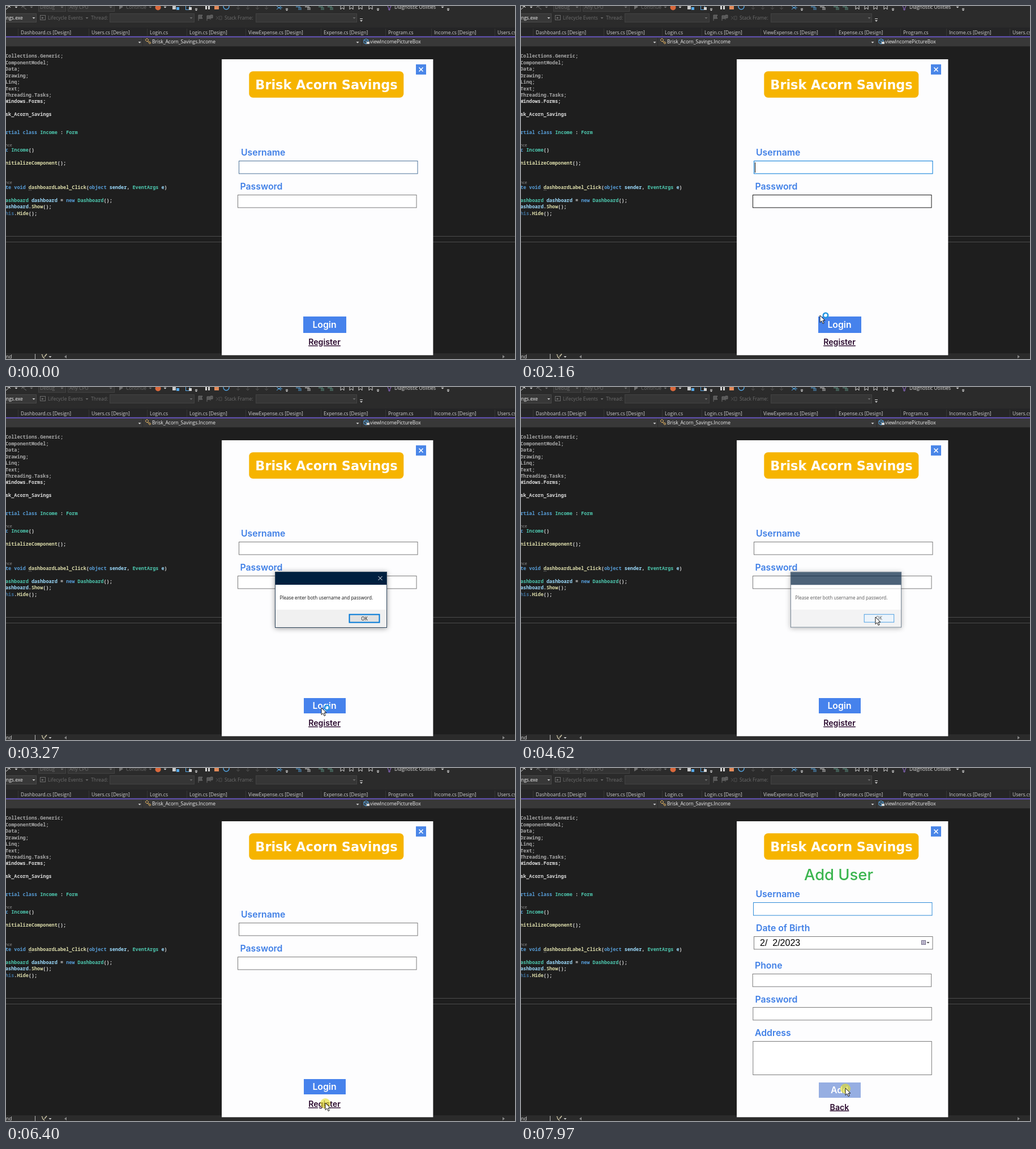
An HTML page for the animation above (8 s loop, 899 px wide and 623 px high).

```html
<!DOCTYPE html>
<html lang="en">
<head>
<meta charset="utf-8">
<title>Login form demo</title>
<style>
  html, body { margin: 0; width: 100%; height: 100%; overflow: hidden; background: #1e1e1e; }
  svg { display: block; width: 899px; height: 623px; }
  text { white-space: pre; font-family: "Open Sans", sans-serif; font-size: 8.5px; }
  .code text { font-family: "Noto Sans Mono", "DejaVu Sans Mono", monospace; font-size: 8.5px; font-weight: 600; }
  .form text { font-family: Inter, Arial, sans-serif; font-size: 15.8px; font-weight: 600; }
  .form text.title { font-family: "DejaVu Sans", sans-serif; font-size: 22.4px; font-weight: bold; }
  .form text.head { font-size: 27.4px; font-weight: 500; }
  .form text.date { font-family: "Liberation Sans", Arial, sans-serif; font-size: 16px; font-weight: normal; }
  .form text.link { font-size: 14.2px; text-decoration: underline; }
  #dialog { filter: drop-shadow(0 1px 5px rgba(0, 0, 0, .4)); }
  #dialog text { font-size: 8.13px; }
</style>
</head>
<body>
<svg id="stage" viewBox="0 0 899 623" xmlns="http://www.w3.org/2000/svg"></svg>
<script>
const NS = 'http://www.w3.org/2000/svg';
const LOOP = 8000;
const BLUE = '#4682ec', HOVER = '#3f75d3', PRESSED = '#96aee2';
const FOCUS = '#0078d7', GREY = '#7a7a7a', DARK = '#171717';

function add(parent, tag, attrs = {}, content) {
  const node = document.createElementNS(NS, tag);
  for (const key in attrs) node.setAttribute(key, attrs[key]);
  if (content !== undefined) node.textContent = content;
  return parent.appendChild(node);
}
const group = (parent, attrs) => add(parent, 'g', attrs);
const rect = (p, x, y, w, h, fill, more) => add(p, 'rect', { x, y, width: w, height: h, fill, ...more });
const text = (p, x, y, str, fill, more) => add(p, 'text', { x, y, fill, ...more }, str);
const path = (p, d, stroke, fill = 'none', more) => add(p, 'path', { d, stroke, fill, ...more });
const down = (p, x, y, fill = '#d0d0d0') => path(p, `M${x - 2.5} ${y - 1}h5l-2.5 2.8z`, 'none', fill);
const show = (node, on) => node.setAttribute('visibility', on ? 'visible' : 'hidden');

const stage = document.getElementById('stage');

function buildToolbar() {
  const g = group(stage);
  const dim = '#6d6d6d', lit = '#d6d6d6', sky = '#55a8e8';
  rect(g, 0, 0, 899, 38, '#2b2b2b');
  rect(g, 0, 38, 899, 16, '#252526');

  // upper row, cut off by the top edge
  path(g, 'M0 6L7 0M2 0q5 0 6 3', lit);
  path(g, 'M36 6L28 0M34 0q-5 0 -7 3', dim);
  for (const [x, w, label] of [[57, 48, 'Debug'], [109, 82, 'Any CPU']]) {
    rect(g, x + .5, -10.5, w, 20, '#333', { stroke: '#424242' });
    text(g, x + 3, 5, label, dim);
    down(g, x + w - 6, 2, dim);
  }
  path(g, 'M200 -3v9l7 -4.5z', 'none', dim);
  text(g, 212, 5, 'Continue', dim);
  for (const x of [18, 281, 771]) down(g, x, 2);
  for (const x of [45, 255]) down(g, x, 2, dim);
  add(g, 'circle', { cx: 268.5, cy: 2.5, r: 5, fill: '#d9683c' });
  rect(g, 294, 0, 6, 6, '#c9c9c9');
  rect(g, 301, 2, 5, 5, sky);
  rect(g, 317.5, -3.5, 7, 10, 'none', { stroke: sky });
  rect(g, 323, 2, 5, 5, lit);
  for (const x of [336, 496, 657, 781]) {
    rect(g, x - 2, 4, 4, 1, lit);
    down(g, x, 7);
  }
  rect(g, 352, 0, 3, 6, lit);
  rect(g, 357, 0, 3, 6, lit);
  rect(g, 368, 0, 8, 6, '#e28a5a');
  add(g, 'circle', { cx: 389, cy: 1, r: 5, fill: 'none', stroke: sky, 'stroke-width': 1.4 });
  for (const x of [410, 427, 444, 460]) path(g, `M${x} -2v8m-3 -3l3 3 3 -3`, '#505050');
  path(g, 'M478 0l8 6M478 6l8 -6M480 3h8', sky);
  for (const [x, c] of [[517, sky], [533, lit], [557, '#5f9a8a'], [573, '#5f9a8a']]) {
    path(g, `M${x - 5} 1.5h8M${x - 1} 3.5h6M${x - 1} 6h6`, c);
  }
  for (const x of [594, 610, 626, 644]) path(g, `M${x - 3} -2v8l3 -3 3 3v-8`, lit);
  path(g, 'M674 0a3.5 3.5 0 1 1 6 0l-2 4v3h-2v-3z', '#9a72dc');
  text(g, 686, 5, 'Diagnostic Utilities', '#dcdcdc');

  // lower row
  rect(g, -5, 13.5, 58.5, 15, '#383838', { stroke: '#484848' });
  text(g, 0, 24, 'ngs.exe', '#f0f0f0');
  down(g, 49, 21);
  rect(g, 60.5, 16.5, 9, 8, 'none', { stroke: dim });
  path(g, 'M63 19l4 2 -4 2z', 'none', dim);
  text(g, 74, 24, 'Lifecycle Events', dim);
  down(g, 143, 21, dim);
  text(g, 150, 24, 'Thread:', dim);
  rect(g, 183.5, 13.5, 149, 15, '#363636', { stroke: '#424242' });
  down(g, 327, 21, dim);
  path(g, 'M340 26v-10h7l-2 3 2 3h-7', dim, '#555');
  path(g, 'M355 26v-9h5v5h-5M361 24v-8h4v5h-4', dim, '#555');
  path(g, 'M371 18l5 6m0 -6l-5 6M377 18h4v6h-4z', '#4c4c4c');
  text(g, 386, 24, 'Stack Frame:', dim);
  rect(g, 441.5, 13.5, 178, 15, '#363636', { stroke: '#424242' });
  down(g, 615, 21, dim);
  rect(g, 625, 22, 5, 1, lit);
  down(g, 627.5, 26);

  const tabs = [[26, 'Dashboard.cs [Design]'], [151, 'Users.cs [Design]'], [254, 'Login.cs'],
    [324, 'Login.cs [Design]'], [428, 'ViewExpense.cs [Design]'], [561, 'Expense.cs [Design]'],
    [675, 'Program.cs'], [756, 'Income.cs [Design]'], [868, 'Users.cs [Design]']];
  for (const [x, label] of tabs) {
    rect(g, x - 5, 40, 1, 13, '#363636');
    text(g, x, 50, label, '#cfcfcf');
  }

  // navigation bar
  rect(g, 0, 55, 899, 16.5, '#383838');
  rect(g, 0, 53.5, 899, 1.8, '#6a58c8');
  rect(g, 241, 56, 1, 15, '#2a2a2a');
  rect(g, 628, 56, 1, 15, '#2a2a2a');
  down(g, 236, 64);
  down(g, 621, 64);
  path(g, 'M246 60l3 -3 3 3 -3 3zM250 63h3M252 65l2 -2 2 2 -2 2z', '#e0b060');
  text(g, 258, 66.3, 'Brisk_Acorn_Savings.Income', '#f0f0f0');
  path(g, 'M632 60l4 -2 4 2v5l-4 2 -4 -2zM632 60l4 2 4 -2M636 62v5', sky);
  rect(g, 637, 63, 5, 4, lit);
  text(g, 643, 66.3, 'viewIncomePictureBox', '#f0f0f0');
}

function buildEditor() {
  const W = '#dcdcdc', G = '#a9a9a9', B = '#569cd6', T = '#4ec9b0', Y = '#dcdcaa', V = '#9cdcfe';
  const lines = [
    [88, ['Collections.Generic;', G]], [99.5, ['ComponentModel;', G]], [111, ['Data;', G]],
    [122.5, ['Drawing;', G]], [134, ['Linq;', G]], [145.5, ['Text;', G]],
    [157, ['Threading.Tasks;', G]], [168, ['Windows.Forms;', W]],
    [191, ['sk_Acorn_Savings', W]],
    [222.5, ['rtial class ', B], ['Income', T], [' : ', W], ['Form', T]],
    [254, ['c ', B], ['Income', T], ['()', W]],
    [277, ['nitializeComponent', Y], ['();', W]],
    [320, ['te void ', B], ['dashboardLabel_Click', Y], ['(', W], ['object', B], [' sender', V],
      [', ', W], ['EventArgs', T], [' e', V], [')', W]],
    [342.5, ['ashboard', T], [' dashboard', V], [' = ', W], ['new', B], [' Dashboard', T], ['();', W]],
    [354, ['ashboard', V], ['.', W], ['Show', Y], ['();', W]],
    [365.5, ['his', '#3f6f9a'], ['.', W], ['Hide', Y], ['();', W]]
  ];
  rect(stage, 0, 71.5, 899, 552, '#1e1e1e');
  const g = group(stage, { class: 'code' });
  for (const [mid, ...parts] of lines) {
    const line = text(g, -1, mid + 3, undefined, W);
    for (const [str, fill] of parts) add(line, 'tspan', { fill }, str);
  }
  for (const y of [248, 314]) text(stage, -1, y, 'nce', '#999', { style: 'font-size:7px' });
  path(stage, 'M40 325h5', '#999', 'none', { 'stroke-dasharray': '1 1' });
  rect(stage, 0, 406, 899, 1, '#4c4c4c');
  rect(stage, 0, 416, 899, 1, '#4c4c4c');

  rect(stage, 0, 613, 899, 10, '#2b2b2b');
  text(stage, 0, 622, 'nd', '#e0e0e0');
  rect(stage, 51, 614, 1, 9, '#bbb');
  path(stage, 'M72 614l-4 5M64 618l4 4M63 615l2 2', '#d0c8a8', 'none', { 'stroke-width': 1.5 });
  down(stage, 78, 619);
  path(stage, 'M107 616v6l-4 -3z', 'none', '#888');
  path(stage, 'M877 616v6l4 -3z', 'none', '#888');
}

const label = (p, x, y, str) => text(p, x, y, str, '#3f7fe6');
const box = (p, x, y, w = 315.5, h = 22.4, stroke = GREY) =>
  rect(p, x + .5, y + .5, w, h, '#fff', { stroke });
const caption = (p, y, str, fill, cls = '') =>
  text(p, 562.5, y, str, fill, { 'text-anchor': 'middle', class: cls });

function setButton(node, y, fill, wide) {
  const inset = wide ? 0 : 1;
  const attrs = { x: 525 + inset, y: y + inset, width: 76 - 2 * inset, height: 29 - 2 * inset, fill };
  for (const key in attrs) node.setAttribute(key, attrs[key]);
}

buildToolbar();
buildEditor();

// window shared by both forms
const win = group(stage, { class: 'form' });
rect(win, 381, 94, 373.4, 522.3, '#fdfdfe');
rect(win, 429.3, 115.2, 273, 46.6, '#f6b400', { rx: 7 });
text(win, 566, 146.5, 'Brisk Acorn Savings', '#fff', { class: 'title', 'text-anchor': 'middle' });
rect(win, 724, 103, 18, 18, '#4a86e8');
path(win, 'M729.5 108.5l7 7m0 -7l-7 7', '#fff', 'none', { 'stroke-width': 1.6 });

const login = group(win);
label(login, 415, 264, 'Username');
const user = box(login, 411, 273);
const caret = rect(login, 413, 276, 1, 18, '#000');
label(login, 413.5, 323.5, 'Password');
const pass = box(login, 409, 333);
const loginBtn = rect(login, 525, 548, 76, 29, BLUE);
caption(login, 568, 'Login', '#fff');
caption(login, 598, 'Register', '#2b0a2e', 'link');

const signup = group(win);
text(signup, 561, 198, 'Add User', '#3bb54f', { class: 'head', 'text-anchor': 'middle' });
label(signup, 414.5, 228, 'Username');
box(signup, 410, 237, 315.5, 22.6, '#2f8bd8');
const caret2 = rect(signup, 412, 240, 1, 18, '#000');
label(signup, 415, 288, 'Date of Birth');
box(signup, 411, 297);
text(signup, 422, 314, '2/  2/2023', '#000', { class: 'date' });
rect(signup, 707.5, 304.5, 7, 7, '#d8d4e6', { stroke: '#6a6480' });
path(signup, 'M708 307h7M708 309.5h7M711 305v7', '#8a84a0', 'none', { 'stroke-width': .7 });
down(signup, 719, 308, '#444');
label(signup, 413, 354, 'Phone');
box(signup, 408.7, 363);
label(signup, 413.5, 413.5, 'Password');
box(signup, 409.3, 422);
label(signup, 413, 473, 'Address');
box(signup, 409.3, 482, 315.5, 59);
const addBtn = rect(signup, 525, 554, 76, 29, BLUE);
caption(signup, 574, 'Add', '#fff');
caption(signup, 603.5, 'Back', '#2b0a2e', 'link');

const dialog = group(stage, { id: 'dialog' });
rect(dialog, 475, 326, 198, 99, '#fff');
rect(dialog, 475, 326, 198, 23, '#00203f');
rect(dialog, 475, 393, 198, 32, '#f0f0f0');
rect(dialog, 475.5, 326.5, 197, 98, 'none', { stroke: '#2f465c' });
const closeX = path(dialog, 'M657.5 334l7 7m0 -7l-7 7', '#fff');
text(dialog, 483.5, 374.5, 'Please enter both username and password.', '#111');
const okBtn = rect(dialog, 606.5, 401.5, 53, 14, '#e1e1e1', { stroke: FOCUS });
text(dialog, 633, 411.5, 'OK', '#111', { 'text-anchor': 'middle' });

const halo = add(stage, 'circle', { r: 9, fill: '#e6e020', 'fill-opacity': .6 });
const pointer = group(stage);
const arrow = group(pointer);
path(arrow, 'M0 0v12.5l2.9 -2.7 2.2 4.7 2.1 -1 -2.2 -4.5h3.9z', '#000', '#fff', { 'stroke-width': .9 });
const beam = path(pointer, 'M-2.5 -7.5h5M0 -7.5v15M-2.5 7.5h5', '#222');
const ring = add(pointer, 'circle', { cx: 10, cy: 0, r: 4.2, fill: '#fff', 'fill-opacity': .6, stroke: '#2596e0', 'stroke-width': 2.6 });

// pointer stops: time, x, y
const stops = [
  [440, 866, 612], [900, 510, 345], [1080, 488, 277], [1210, 490, 285], [1260, 490, 285],
  [1650, 505, 345], [2040, 512, 404], [2160, 528, 546], [2480, 556, 571], [2800, 557, 566],
  [3270, 557, 566], [3740, 627, 406], [4500, 627, 406], [4620, 626, 406], [5270, 564, 591],
  [6520, 564, 591], [7040, 572, 562], [7350, 572, 562], [7540, 571, 579], [7720, 573, 565]
];
const clicks = [[2800, 2950], [4500, 4600], [6400, 6530], [7965, LOOP]];
const within = (t, a, b) => t >= a && t < b;
const ramp = (t, a, b) => Math.min(1, Math.max(0, (t - a) / (b - a)));

function place(t) {
  const i = stops.findIndex(s => s[0] > t);
  if (i === 0) return stops[0].slice(1);
  if (i < 0) return stops[stops.length - 1].slice(1);
  const [a, b] = [stops[i - 1], stops[i]];
  const p = ramp(t, a[0], b[0]), e = p * p * (3 - 2 * p);
  return [a[1] + (b[1] - a[1]) * e, a[2] + (b[2] - a[2]) * e];
}

function drawForms(t) {
  const first = t < 6600;
  login.style.display = first ? '' : 'none';
  signup.style.display = first ? 'none' : '';

  user.setAttribute('stroke', t < 60 ? '#4d7399' : t < 120 ? '#2676b8' : t < 2960 ? FOCUS : GREY);
  pass.setAttribute('stroke', within(t, 860, 980) || within(t, 1590, 2960) ? DARK : GREY);
  show(caret, within(t, 60, 2890) && Math.floor((t - 60) / 523) % 2 === 0);
  show(caret2, within(t, 7440, 7965));

  const loginFill = within(t, 2220, 2800) ? HOVER : within(t, 2800, 2960) ? PRESSED : BLUE;
  setButton(loginBtn, 548, loginFill, t < 2800);
  const addFill = t >= 7965 ? PRESSED : t >= 6880 ? HOVER : BLUE;
  setButton(addBtn, 554, addFill, t < 7965);
}

function drawDialog(t) {
  const open = within(t, 2960, 4740);
  dialog.style.display = open ? '' : 'none';
  if (!open) return;
  const enter = ramp(t, 2940, 3130), leave = ramp(t, 4570, 4737);
  const scale = 1 - .1 * (1 - enter) ** 2 - .03 * leave;
  dialog.setAttribute('opacity', enter * (1 - leave));
  dialog.setAttribute('transform', `translate(573.5 375.5) scale(${scale}) translate(-573.5 -375.5)`);
  show(closeX, t < 4570);
  const hover = ramp(t, 3790, 4120);
  const mix = (a, b) => Math.round(a + (b - a) * hover);
  okBtn.setAttribute('fill', `rgb(${mix(225, 229)},${mix(225, 241)},${mix(225, 251)})`);
  okBtn.setAttribute('stroke-width', 2 - hover);
}

function drawPointer(t) {
  const [x, y] = place(t);
  const typing = t < 2160 && x > 410 && x < 727 && (within(y, 273, 296) || within(y, 333, 356));
  pointer.style.display = t < 440 ? 'none' : '';
  pointer.setAttribute('transform', `translate(${x} ${y})`);
  arrow.style.display = typing ? 'none' : '';
  beam.style.display = typing ? '' : 'none';
  ring.style.display = !typing && t < 3350 ? '' : 'none';
  halo.setAttribute('cx', x);
  halo.setAttribute('cy', y + 1);
  show(halo, clicks.some(([a, b]) => within(t, a, b)));
}

const start = performance.now();
function frame() {
  const t = (performance.now() - start) % LOOP;
  drawForms(t);
  drawDialog(t);
  drawPointer(t);
  requestAnimationFrame(frame);
}
frame();
</script>
</body>
</html>
```
